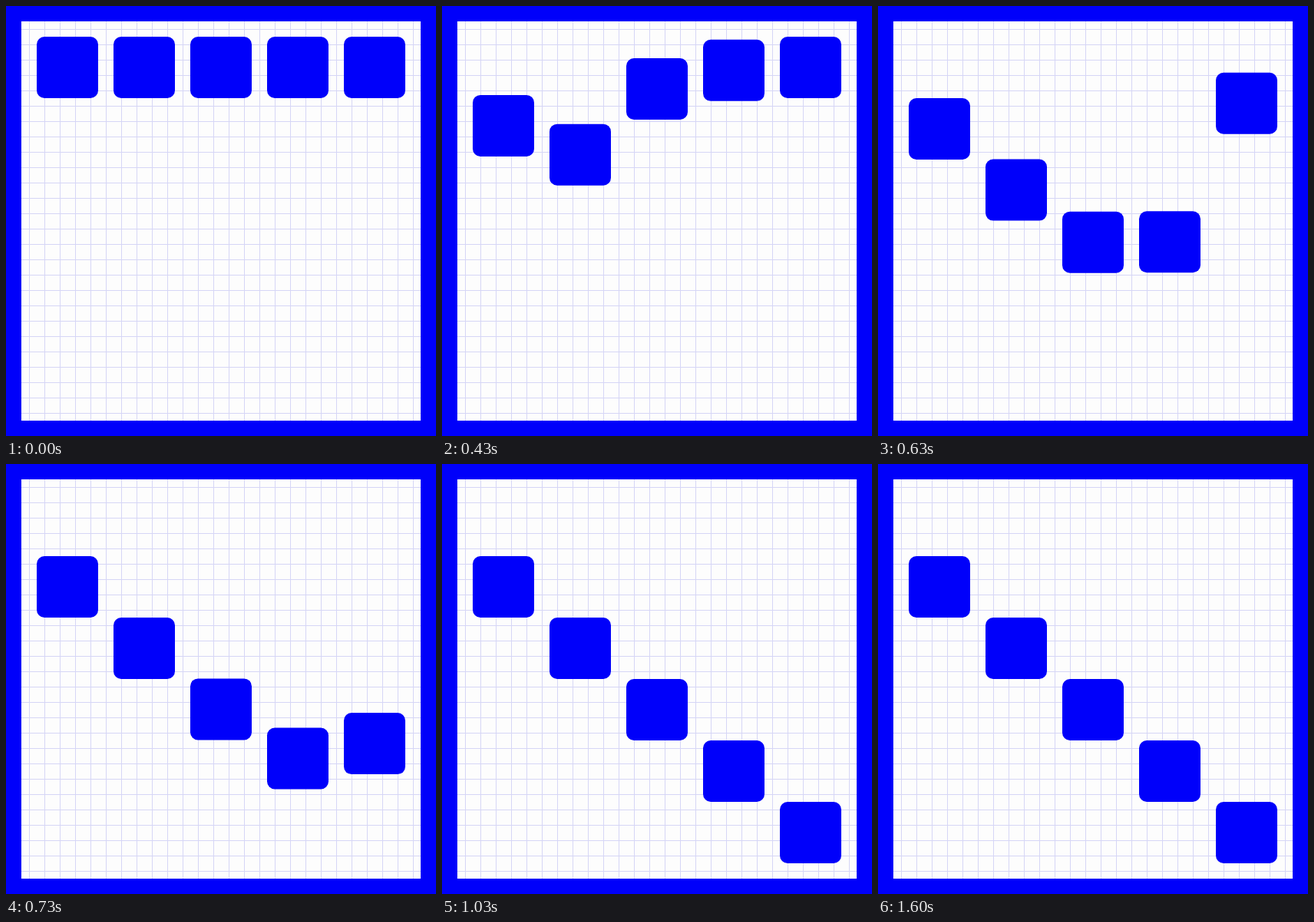
Write an HTML page with a canvas that moves like this. It is 560 px wide and 560 px high and loops after 1620 ms.

```html
<!DOCTYPE html>
<html lang="en">
<head>
<meta charset="utf-8">
<title>Staggered drop</title>
<style>
  html, body { margin: 0; overflow: hidden; }
  canvas { display: block; }
</style>
</head>
<body>
<canvas id="stage" width="560" height="560"></canvas>
<script>
const ctx = document.getElementById('stage').getContext('2d');
const LOOP = 1620, STEP = 25;
const START = 58.4, STAGGER = 100, DURATION = 500;
const BLUE = '#0000fa', PAPER = '#fdfdfd', GRID = '#d6d6f6';

// cubic-bezier(.77, 0, .175, 1)
function easeInOutQuart(x) {
  if (x <= 0) return 0;
  if (x >= 1) return 1;
  let low = 0, high = 1, s;
  for (let i = 0; i < 24; i++) {
    s = (low + high) / 2;
    const r = 1 - s;
    if (3 * s * r * r * 0.77 + 3 * s * s * r * 0.175 + s ** 3 < x) low = s;
    else high = s;
  }
  return s * s * (3 - 2 * s);
}

function box(color, x, y, w, h) {
  ctx.fillStyle = color;
  ctx.fillRect(x, y, w, h);
}

function draw(time) {
  box(BLUE, 0, 0, 560, 560);
  box(PAPER, 20, 20, 520, 520);
  for (let p = 30; p < 540; p += 20) {
    box(GRID, 20, p, 520, 1);
    box(GRID, p, 20, 1, 520);
  }

  ctx.fillStyle = BLUE;
  for (let i = 0; i < 5; i++) {
    const progress = easeInOutQuart((time - START - i * STAGGER) / DURATION);
    ctx.beginPath();
    ctx.roundRect(40 + i * 100, 40 + 80 * (i + 1) * progress, 80, 80, 10);
    ctx.fill();
  }
}

const begin = performance.now();
function tick() {
  const time = (performance.now() - begin) % LOOP;
  draw(Math.floor(time / STEP) * STEP);
  requestAnimationFrame(tick);
}
tick();
</script>
</body>
</html>
```
